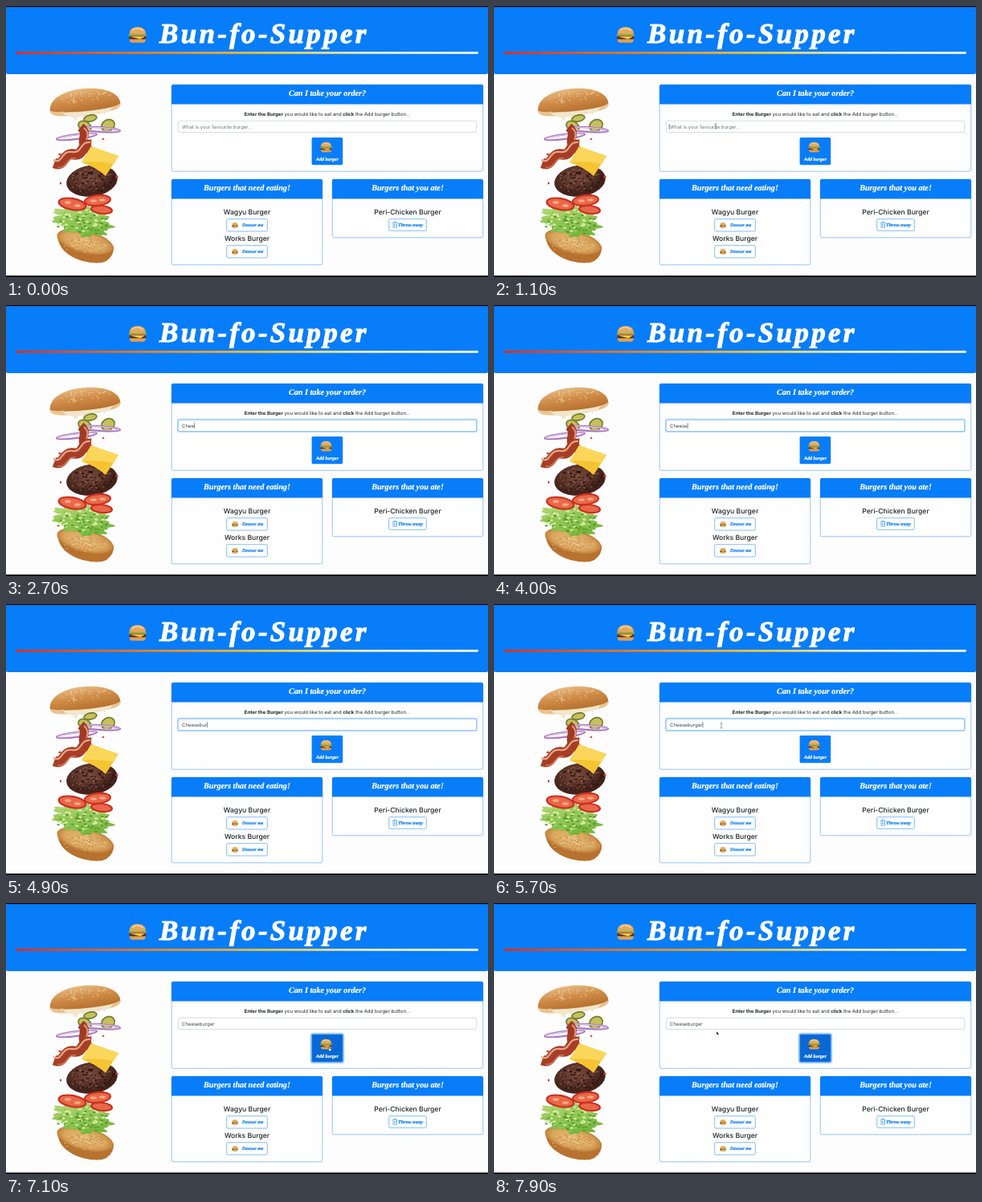
Animation, 600 px wide and 338 px high, one loop 8 s. Source, as an HTML page:

```html
<!DOCTYPE html>
<html lang="en">
<head>
<meta charset="utf-8">
<title>Burger order page</title>
<style>
  html, body { margin: 0; width: 100%; height: 100%; overflow: hidden; background: #fefdfd; }
  svg { display: block; }
  #stage { width: 100vw; height: 100vh; }
  text { font-family: Inter, "Open Sans", sans-serif; fill: #212529; text-rendering: geometricPrecision; white-space: pre; }
  .script { font-family: "Liberation Serif", "Noto Serif", serif; font-weight: 700; font-style: italic; fill: #fff; stroke: #fff; stroke-width: .22; }
  .title { font-size: 35px; letter-spacing: 3.3px; stroke-width: 1.1; stroke-linejoin: round; }
  .head { font-size: 10.2px; }
  .mid { text-anchor: middle; }
  .item { font-size: 8.6px; font-weight: 500; }
  .blue { fill: #087df9; }
  .script.blue { stroke: #087df9; }
  .card { fill: #fefefe; stroke: #7db8fb; stroke-width: .8; }
  .btn { fill: #fff; stroke: #4b9ffa; stroke-width: .7; }
</style>
</head>
<body>
<svg id="stage" viewBox="0 0 600 338" preserveAspectRatio="none">
  <defs>
    <linearGradient id="rule">
      <stop offset="0" stop-color="#df2b1c"/>
      <stop offset=".3" stop-color="#e58428"/>
      <stop offset=".55" stop-color="#f1c83f"/>
      <stop offset=".78" stop-color="#f1efc3"/>
      <stop offset="1" stop-color="#fff"/>
    </linearGradient>
    <linearGradient id="bun" x2=".2" y2="1">
      <stop offset="0" stop-color="#ecc08a"/>
      <stop offset=".5" stop-color="#cf8d48"/>
      <stop offset="1" stop-color="#b56d2d"/>
    </linearGradient>
    <radialGradient id="crumb">
      <stop offset="0" stop-color="#e8bd7b"/>
      <stop offset=".75" stop-color="#d9a45c"/>
      <stop offset="1" stop-color="#c0813b"/>
    </radialGradient>
    <radialGradient id="meat" cx=".45" cy=".35">
      <stop offset="0" stop-color="#7d4c3d"/>
      <stop offset="1" stop-color="#43231c"/>
    </radialGradient>
    <linearGradient id="leaf" x2=".3" y2="1">
      <stop offset="0" stop-color="#bddc7c"/>
      <stop offset="1" stop-color="#76b63c"/>
    </linearGradient>
    <symbol id="emoji" viewBox="0 0 20 18">
      <path d="M1 8C1 2.500 5 .3 10 .3S19 2.500 19 8q-9 1.800-18 0z" fill="#e5a95c"/>
      <path d="M4 4.300q2-2.600 6-2.400t6 2.400" stroke="#f6d49b" stroke-width="1.300" fill="none"/>
      <path d="M.3 8.300q2-1.200 4 0t4 0 4 0 4 0 3.400 0v1.800H.3z" fill="#82b744"/>
      <path d="M1 9.800h18v1.300H1z" fill="#cf4630"/>
      <rect x=".6" y="10.800" width="18.800" height="3.200" rx="1.500" fill="#59301f"/>
      <path d="M2 10.800h16l-5 3z" fill="#fbcb3a"/>
      <path d="M1 13.800h18q0 3.900-4 3.900H5q-4 0-4-3.900z" fill="#dfa055"/>
    </symbol>
    <symbol id="onion" viewBox="0 0 54 10" overflow="visible">
      <g fill="none">
        <ellipse cx="27" cy="5" rx="25" ry="2.800" stroke="#a873bb" stroke-width="2.400"/>
        <ellipse cx="27" cy="4.600" rx="24" ry="2" stroke="#ead9ef" stroke-width=".9"/>
      </g>
    </symbol>
  </defs>

  <rect width="600" height="338" fill="#fefdfd"/>
  <path class="blue" d="M0 1H600V83Q600 85 598 85H2Q0 85 0 83z"/>
  <path d="M0 0H600V1.200H0zM0 336.300H600V338H0z" fill="#000"/>
  <use href="#emoji" x="152.500" y="25.800" width="22.600" height="20.400"/>
  <text class="script title" x="191" y="45.700">Bun-fo-Supper</text>
  <rect x="12" y="57" width="576" height="2.700" rx="1.300" fill="url(#rule)"/>

  <!-- exploded burger -->
  <g id="food">
    <g transform="rotate(-5 98 120)">
      <path d="M54 128C53 114 70 103 97 103s46 9 45 23q-4 9-43 9t-45-7z" fill="url(#bun)"/>
      <path d="M54 127q10 4 44 4t44-6q1 7-15 9-30 4-58 1-15-1-15-8z" fill="#e9c48f"/>
      <path d="M66 130q30 4 66-1l-4 5q-5-1-6 3-2 1-3-2-7-1-10 1-1 5-3 6-2-4-4-5-4 0-5 8-2 1-3-7-4-2-7 1-2 5-4 1-1-4-6-4-6-1-7-7z" fill="#f0e7cd"/>
      <g id="seeds"></g>
    </g>
    <g fill="#c6c15c" stroke="#747f30" stroke-width="1.800">
      <ellipse cx="105" cy="140" rx="8" ry="4" transform="rotate(-12 105 140)"/>
      <ellipse cx="98" cy="150" rx="8.500" ry="6" transform="rotate(30 98 150)"/>
      <ellipse cx="127" cy="149" rx="8.500" ry="7" transform="rotate(-30 127 149)"/>
    </g>
    <use href="#onion" x="61" y="158" width="54" height="10" transform="rotate(-7 88 163)"/>
    <use href="#onion" x="90" y="149" width="54" height="10" transform="rotate(4 117 154)"/>
    <g fill="none">
      <path d="M93 151C104 160 90 168 100 176S105 184 110 189" stroke="#a03a25" stroke-width="11"/>
      <path d="M97 152C108 161 94 169 104 176" stroke="#e39a7b" stroke-width="2"/>
      <path d="M60 196C74 201 70 183 84 185S92 172 106 173" stroke="#a63e27" stroke-width="13"/>
      <path d="M59 192C71 198 68 180 82 182S91 169 105 170" stroke="#e8a482" stroke-width="2.200"/>
      <path d="M64 201C78 203 74 188 87 190" stroke="#cf7450" stroke-width="1.600"/>
    </g>
    <g transform="rotate(-8 107 218)">
      <ellipse cx="107" cy="218" rx="32" ry="19.500" fill="url(#meat)"/>
      <g id="grill"></g>
    </g>
    <path d="M94 195L106 175Q122 181 140 187L124 212Q112 201 94 195z" fill="#f5c433"/>
    <path d="M94 195L106 175Q122 181 140 187L134 197Q116 193 94 195z" fill="#fad75a"/>
    <path d="M64 287Q66 278 80 279 108 280 134 300 135 311 125 318 116 323 95 318 66 309 64 287z" fill="#b8722f"/>
    <ellipse cx="98.500" cy="294" rx="36" ry="14" transform="rotate(14 98.500 294)" fill="url(#crumb)"/>
    <g id="toast"></g>
    <path id="lettuce" fill="url(#leaf)"/>
    <g id="frill"></g>
    <g fill="#e9684a" stroke="#cb3020" stroke-width="2.200">
      <ellipse cx="119" cy="254" rx="13" ry="5" transform="rotate(6 119 254)"/>
      <ellipse cx="82.500" cy="247" rx="17" ry="7" transform="rotate(10 82.500 247)"/>
      <ellipse cx="114" cy="242.500" rx="16" ry="6.500" transform="rotate(-6 114 242.500)"/>
    </g>
    <g fill="#f4aa84">
      <ellipse cx="77" cy="245" rx="4" ry="1.800"/><ellipse cx="89" cy="249" rx="4" ry="1.800"/>
      <ellipse cx="109" cy="243" rx="4" ry="1.700"/><ellipse cx="120" cy="242" rx="4" ry="1.700"/>
    </g>
    <g fill="#d5362a">
      <ellipse cx="67" cy="185" rx="1.700" ry="1.200"/><ellipse cx="138" cy="213" rx="1.800" ry="1.300"/>
      <ellipse cx="68" cy="221" rx="1.200" ry="1.500"/><ellipse cx="73" cy="240" rx="1.400" ry="1"/>
      <ellipse cx="121" cy="166" rx="1.400" ry="1"/>
    </g>
  </g>

  <g id="cards"></g>

  <text class="mid" x="400" y="136.800" font-size="6.060"><tspan font-weight="700">Enter the Burger</tspan> you would like to eat and <tspan font-weight="700">click</tspan> the Add burger button...</text>

  <rect id="glow" x="213.500" y="142.400" width="373" height="16" rx="2.200" fill="none" stroke="#b5d6fc" stroke-width="1.200"/>
  <rect id="field" x="214.400" y="143.300" width="371.200" height="14.200" rx="1.600" fill="#fff" stroke-width=".8"/>
  <text id="value" x="219" y="152.700" font-size="6"></text>
  <path id="caret" d="M0 147.200V154" stroke="#333" stroke-width=".6"/>

  <rect id="ring" x="379.700" y="163" width="40.400" height="36.200" rx="2.600" fill="none" stroke="#8fc1fb" stroke-width="1.800"/>
  <rect id="add" x="380.600" y="164" width="38.600" height="34.200" rx="1.600"/>
  <use href="#emoji" x="391" y="169.500" width="15" height="13.200"/>
  <text class="script mid" x="400" y="193" font-size="6">Add burger</text>

  <text class="mid item" x="300" y="260">Wagyu Burger</text>
  <text class="mid item" x="300" y="293">Works Burger</text>
  <text class="mid item" x="500" y="260">Peri-Chicken Burger</text>
  <g id="devour">
    <rect class="btn" x="274.700" y="265.700" width="50.600" height="15.300" rx="1.600"/>
    <use href="#emoji" x="281" y="269.500" width="8" height="7.400"/>
    <text class="script blue" x="294" y="275.300" font-size="5.800">Devour me</text>
  </g>
  <use href="#devour" y="33"/>
  <rect class="btn" x="476.700" y="265.700" width="46.600" height="14.600" rx="1.600"/>
  <path d="M481.200 270.300H487.200M483 270V269.200H485.400V270M481.900 270.500V276.300H486.500V270.500M483.400 271.800V275M485 271.800V275" fill="none" stroke="#1f88f8" stroke-width=".6"/>
  <text class="script blue" x="488" y="275.300" font-size="6.100">Throw away</text>

  <g id="mouse">
    <path id="beam" d="M-1.200-3.300Q0-3.300 0-2.500Q0-3.300 1.200-3.300M0-2.500V2.500M-1.200 3.300Q0 3.300 0 2.500Q0 3.300 1.200 3.300" fill="none" stroke="#333" stroke-width=".5"/>
    <path id="arrow" d="M0 0V4.600L1.100 3.600 1.900 5.300 2.700 4.900 1.900 3.300H3.300z" fill="#111" stroke="#fff" stroke-width=".4"/>
    <path id="hand" d="M0 0Q.7-.3 .8 .5V1.700L2.700 2.200Q3.200 2.500 2.900 3.400L2.500 4.600H.5L-1 2.800Q-.8 2.200 0 2.800z" fill="#fff" stroke="#222" stroke-width=".4"/>
  </g>
</svg>

<script>
const LOOP = 8000, STEP = 100;
const FOCUS = 1100, HOVER = 6200, CLICK = 6900;
const WORD = "Cheeseburger";
const KEYS = [1900, 2150, 2400, 2600, 3100, 3600, 4300, 4550, 4800, 5100, 5300, 5500];
const PATH = [
  [900, 276, 150], [5600, 276, 150], [6300, 402, 180],
  [7200, 402, 180], [7900, 277, 160], [8000, 277, 160]
];
const $ = id => document.getElementById(id);
const set = (id, name, value) => $(id).setAttribute(name, value);
const show = (id, on) => set(id, "visibility", on ? "visible" : "hidden");

const CARDS = [
  [206, 98, 388, 108.5, "Can I take your order?"],
  [206, 216, 188, 107, "Burgers that need eating!"],
  [406, 216, 188, 73, "Burgers that you ate!"]
];
$("cards").innerHTML = CARDS.map(([x, y, w, h, title]) => `
  <rect class="card" x="${x + .2}" y="${y + .2}" width="${w - .4}" height="${h - .4}" rx="2"/>
  <path class="blue" d="M${x} ${y + 24.5}v-22.5q0-2 2-2h${w - 4}q2 0 2 2v22.5z"/>
  <text class="script head mid" x="${x + w / 2}" y="${y + 14}">${title}</text>`).join("");

let seed = 7;
const rand = () => (seed = seed * 16807 % 2147483647) / 2147483647;
// Scatter small specks inside an ellipse.
function specks(id, n, cx, cy, rx, ry, size, fill) {
  let out = "";
  for (let i = 0; i < n; i++) {
    const a = rand() * 6.283, r = Math.sqrt(rand());
    out += `<ellipse cx="${cx + Math.cos(a) * r * rx}" cy="${cy + Math.sin(a) * r * ry}" rx="${size}" ry="${size * .6}" fill="${fill}"/>`;
  }
  $(id).innerHTML += out;
}
specks("seeds", 40, 98, 114, 33, 8, .9, "#f3d9aa");
specks("grill", 60, 107, 218, 28, 16, 1.6, "#2f1915");
specks("grill", 45, 105, 217, 27, 15, 1.1, "#94604e");
specks("toast", 50, 98, 298, 28, 10, 1, "#c28a48");
specks("toast", 30, 98, 298, 28, 10, .9, "#f0cf97");

// Ruffled leaf edge: an ellipse with ripples.
const edge = [];
for (let a = 0; a < 6.283; a += .06) {
  const r = 1 + .11 * Math.sin(9 * a + 1) + .07 * Math.sin(21 * a);
  edge.push(`${95 + 35 * r * Math.cos(a)} ${268 + (6 * Math.cos(a)) + 18 * r * Math.sin(a)}`);
}
set("lettuce", "d", `M${edge.join("L")}z`);
specks("frill", 45, 95, 269, 32, 16, 2.6, "#8cc653");
specks("frill", 40, 95, 269, 32, 16, 2, "#d3e9a0");
specks("frill", 35, 96, 272, 32, 15, 1.8, "#5b9c2d");

function mouseAt(t) {
  const i = Math.max(1, PATH.findIndex(p => p[0] > t));
  const [t0, x0, y0] = PATH[i - 1], [t1, x1, y1] = PATH[i];
  const u = Math.max(0, (t - t0) / (t1 - t0)), k = u * u * (3 - 2 * u);
  return [x0 + (x1 - x0) * k, y0 + (y1 - y0) * k];
}

function draw(t) {
  const typed = KEYS.filter(k => k <= t).length;
  const value = $("value");
  value.textContent = typed ? WORD.slice(0, typed) : "What is your favourite burger...";
  value.style.fill = typed ? "#3a4047" : "#6c757d";

  const focused = t >= FOCUS && t < CLICK;
  const fade = focused ? Math.min(1, (t - FOCUS) / 150) : 0;
  set("glow", "opacity", fade);
  set("field", "stroke", fade > .5 ? "#80bdff" : "#ced4da");
  const lastKey = typed ? KEYS[typed - 1] : FOCUS;
  show("caret", focused && (t - lastKey) % 1000 < 500);
  const end = typed ? value.getComputedTextLength() + .5 : -.8;
  set("caret", "transform", `translate(${219 + end} 0)`);

  const [x, y] = mouseAt(t);
  const over = x > 381 && x < 419 && y > 164 && y < 198;
  const inField = y > 143 && y < 158;
  set("add", "fill", (t >= HOVER && over) || t >= CLICK ? "#0869d6" : "#087df9");
  show("ring", t >= CLICK);

  const visible = (t >= 900 && t < KEYS[0]) || t >= 5600;
  set("mouse", "transform", `translate(${x} ${y})`);
  show("beam", visible && inField);
  show("hand", visible && over);
  show("arrow", visible && !over && !inField);
}

const start = performance.now();
function tick() {
  const t = Math.max(0, performance.now() - start) % LOOP;
  draw(Math.floor(t / STEP) * STEP);
  requestAnimationFrame(tick);
}
draw(0);
requestAnimationFrame(tick);
</script>
</body>
</html>
```
